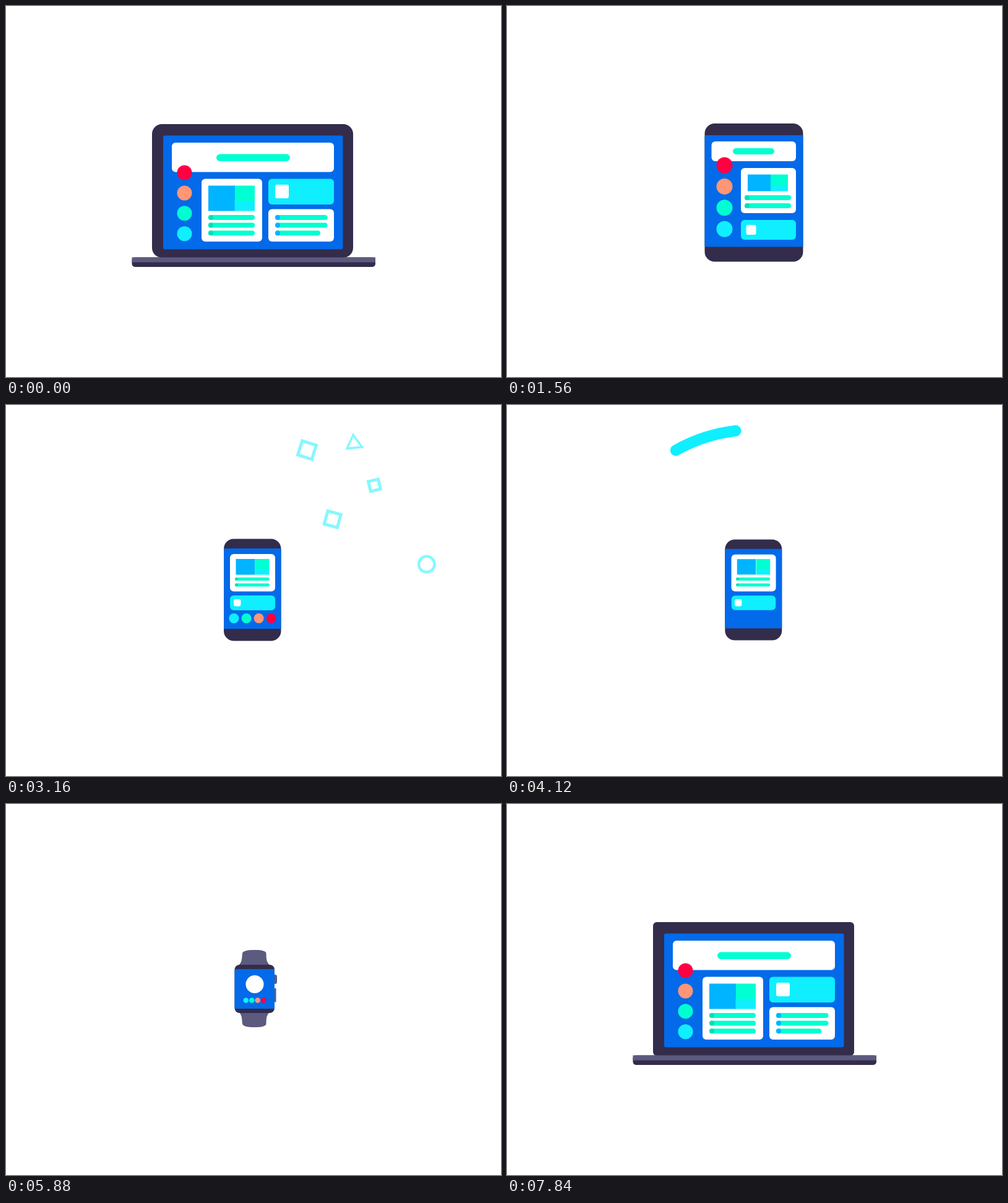
An HTML page with a canvas for the animation above (7.96 s loop, 800 by 600 pixels).

```html
<!DOCTYPE html>
<html>
<head>
<meta charset="utf-8">
<title>Devices</title>
<style>
html, body { margin: 0; width: 100%; height: 100%; overflow: hidden; background: #fff; }
canvas { display: block; }
</style>
</head>
<body>
<canvas id="stage" width="800" height="600"></canvas>
<script>
const g = document.getElementById('stage').getContext('2d');
const LOOP = 7960, RAD = Math.PI / 180;
const DARK = '#332c4b', GREY = '#5c5a7e', BLUE = '#036ae9', CYAN = '#0fefff', GREEN = '#00ffd2',
      SKY = '#00b4ff', RED = '#ff0044', ORANGE = '#ff9676', CAP = '#00e0b8', WHITE = '#fff';

const clamp = v => Math.max(0, Math.min(1, v));
const ease = v => (v = clamp(v), v * v * (3 - 2 * v));
const mix = (a, b, p) => a + (b - a) * p;

// Steps: laptop > tablet > phone > watch > laptop
const steps = [
  { at: 40, wait: 0, len: 600, dot: 102, gap: 110, arc: [0, -40, 140, GREEN] },
  { at: 1960, wait: 400, len: 600, dot: 300, gap: 66, arc: [40, 150, 330, CYAN] },
  { at: 3920, wait: 150, len: 600, dot: 250, gap: 60, arc: [40, -128, 70, CYAN] },
  { at: 5880, wait: 50, len: 500, dot: 352, gap: 66, arc: [104, 120, 322, '#f5003c'] }
];
let step, age, morph;

// ---- Device and page parts ----
function fillBox([x, y, w, h, r], color) {
  if (w < 0.2 || h < 0.2) return;
  g.fillStyle = color;
  g.beginPath();
  g.roundRect(x, y, w, h, Math.min(r, w / 2, h / 2));
  g.fill();
}

const collapse = b => [b[0] + b[2] / 2, b[1] + b[3] / 2, 0, 0, b[4]];

// One box per device; a missing one shrinks to the middle of its neighbour.
function part(color, ...boxes) {
  let a = boxes[step], b = boxes[step === 3 && !boxes[4] ? 0 : step + 1];
  if (!a && !b) return;
  a = a || collapse(b);
  b = b || collapse(a);
  fillBox(a.map((v, i) => mix(v, b[i], morph)), color);
}

function base() {
  const s = step === 0 ? 1 - morph : step === 3 ? morph : 0;
  if (s < 0.01) return;
  const w = 393.5 * s, x = 400.25 - w / 2;
  fillBox([x, 406.5, w, 15.5, 5], DARK);
  g.fillStyle = GREY;
  g.fillRect(x, 406.5, w, 8);
}

function straps() {
  const s = step === 2 ? morph : step === 3 ? 1 - morph : 0;
  if (s < 0.01) return;
  g.save();
  g.translate(402, 298.5);
  g.scale(s, s);
  g.fillStyle = GREY;
  for (const side of [1, -1]) {
    g.save();
    g.scale(1, side);
    g.beginPath();
    g.moveTo(-28, -36);
    g.bezierCurveTo(-20, -42, -21, -48, -20, -57);
    g.quadraticCurveTo(-19, -62.5, 0, -62.5);
    g.quadraticCurveTo(18, -62.5, 18.5, -57);
    g.bezierCurveTo(19, -48, 18, -42, 27, -36);
    g.fill();
    g.restore();
  }
  fillBox([28, -22.5, 8, 15, 3], GREY);
  fillBox([28, -0.5, 6.5, 22.5, 1], GREY);
  g.restore();
}

function device() {
  straps();
  part(DARK, [236, 191, 325, 216, 16], [319.5, 190, 159, 223.5, 16], [352, 216.5, 92.5, 165, 16],
    [369.5, 260, 64.5, 78, 8], [236, 191, 325, 216, 6]);
  base();
  part(BLUE, [254, 209.5, 290.5, 184, 3], [319.5, 209, 159, 180.5, 2], [352, 232, 92.5, 130, 0], [369.5, 267, 64.5, 64, 0]);
  part(WHITE, [268, 221, 262, 47.5, 6], [330.5, 219, 136.5, 32, 6]);
  part(GREEN, [340, 239.5, 119, 11.5, 6], [365, 230, 67, 10, 5]);

  part(WHITE, [316, 279.5, 98, 101.5, 6], [378, 262, 89, 73, 6], [362, 241, 73, 60.5, 6], [387.5, 277, 29, 29, 15]);
  part(SKY, [327, 290.5, 43, 41, 0], [389, 272.5, 37, 27, 0], [371.5, 249, 31, 25.5, 0]);
  part(CYAN, [369.5, 315, 32.5, 16.5, 0], [426, 289.5, 28, 10, 0], [402.5, 265, 23, 9.5, 0]);
  part(GREEN, [370, 290.5, 32, 25, 0], [426, 272.5, 28, 17.5, 0], [402.5, 249, 23, 17, 0]);
  for (let i = 0; i < 3; i++) {
    const y = 338 + 12.6 * i, ty = 306 + 13 * i, py = 279 + 9.5 * i, few = i < 2;
    part(GREEN, [327, y, 75, 8, 4], few && [384, ty, 75, 8, 4], few && [370, py, 56, 5, 3]);
    part(CAP, [327, y, 8, 8, 4], few && [384, ty, 8, 8, 4], few && [370, py, 5, 5, 3]);
  }

  part(CYAN, [424, 279.5, 106, 41.5, 6], [378, 346, 89, 32, 6], [362, 308, 73, 24, 6]);
  part(WHITE, [435, 289, 22, 22, 3], [386.5, 354, 16, 16, 3], [368, 314, 11.5, 11.5, 3]);

  part(WHITE, [424, 328.5, 106, 52.5, 6]);
  for (let i = 0; i < 3; i++) {
    const y = 338 + 12.6 * i;
    part(GREEN, [435, y, i < 2 ? 84.5 : 73, 8, 4]);
    part(SKY, [435, y, 8, 8, 4]);
  }
}

// ---- Four coloured dots ----
function dotPlace(state, i) {
  return [
    [288.5, 269.5 + 32.9 * i, 12],
    [351.5, 257.5 + 34.4 * i, 13],
    [428.7 - 20.1 * i, 345, 8],
    [416.2 - 9.5 * i, 317.5, 4.3]
  ][state % 4];
}

function dots() {
  const s = steps[step];
  [RED, ORANGE, GREEN, CYAN].forEach((color, i) => {
    const q = ease((age - s.dot - s.gap * i) / 400);
    const a = dotPlace(step, i), b = dotPlace(step + 1, i);
    let [x, y, r] = a.map((v, k) => mix(v, b[k], q));
    if (step === 0) y -= 7 * Math.sin(Math.PI * q);
    if (step === 3) {
      if (q > 0) {
        x = mix(440, b[0], q);
        y = mix(277 + 9 * i, b[1], q);
        r = b[2] * q ** 0.45;
      } else r = a[2] * (1 - clamp(age / 200));
    }
    if (step === 2) g.globalAlpha = clamp(Math.max(1 - age / 200, (age - 500) / 530 + 0.15 * i));
    g.fillStyle = color;
    g.beginPath();
    g.arc(x, y, r, 0, 7);
    g.fill();
    g.globalAlpha = 1;
  });
}

// ---- Sweeping stroke ----
function sweep() {
  const [wait, from, to, color] = steps[step].arc;
  const at = d => mix(from, to, ease((age - wait - d) / 640));
  const head = at(0), tail = at(80), len = head - tail;
  if (len < 0.5) return;
  g.strokeStyle = color;
  g.lineCap = 'round';
  g.lineWidth = 18 * Math.min(1, len / 20);
  g.beginPath();
  g.arc(400, 300, 260, tail * RAD, head * RAD);
  g.stroke();
}

// ---- Outlined confetti ----
const AGES = [0, 0.25, 0.4, 0.8, 1];
function keyed(row, a) {
  let i = 0;
  while (i < 3 && a > AGES[i + 1]) i++;
  return mix(row[i], row[i + 1], (a - AGES[i]) / (AGES[i + 1] - AGES[i]));
}

// dist and spin follow AGES; size is the distance from centre to corner
const pieces = [
  { sides: 0, dir: 184, dist: [175, 236, 241, 283, 288], spin: [0, 0, 0, 0, 0], size: a => 5.8 + 8.7 * a },
  { sides: 4, dir: 150.6, dist: [105, 123, 138, 172, 182], spin: [-45, -24, -8, 28, 48], size: a => 0.71 * (9 + 16 * a) },
  { sides: 4, dir: 151.6, dist: [260, 247, 248, 259, 281], spin: [57, 42, 42, 89, 86], size: a => 0.71 * (12.5 + 6 * a * a) },
  { sides: 3, dir: 137, dist: [90, 135, 192, 288, 298], spin: [40, 64, 95, 97, 78], size: a => 4 + 12.5 * a },
  { sides: 4, dir: 123.5, dist: [200, 210, 211, 243, 247], spin: [6, 15, 17, 30, 54], size: a => 0.71 * (14.5 + 11.5 * a) }
];

// time, age and turn at that time, life speed in ms, colours
const bursts = [
  [760, 0.4, 0, 700, '#14f7d2'],
  [3160, 0.8, 167.3, 900, CYAN],
  [4800, 1, -42.7, 500, CYAN],
  [4800, 0.25, -101.4, 700, CYAN],
  [6480, 0, 77.8, 700, GREEN, CYAN],
  [6480, 0, 257.8, 700, GREEN, CYAN],
  [6620, 0, 115, 1000, GREEN, CYAN]
];
const drift = a => 110 * (1 - Math.exp(-1.5 * a));

function confetti(t) {
  for (const [at, a0, turn0, life, color, ringColor = color] of bursts) {
    const a = a0 + (t - at) / life;
    if (a < -0.1 || a > 1.2) continue;
    const turn = turn0 + drift(a) - drift(a0);
    const grow = clamp((a + 0.1) / 0.1);
    g.globalAlpha = a < 1 ? 1 - 0.5 * clamp((a - 0.45) / 0.35) : 0.5 * (1.2 - a) / 0.2;
    g.lineJoin = 'miter';
    for (const p of pieces) {
      const dir = (p.dir + turn) * RAD, d = keyed(p.dist, a), r = p.size(a) * grow;
      if (r <= 0) continue;
      const x = 400 + d * Math.cos(dir), y = 300 + d * Math.sin(dir);
      g.strokeStyle = p.sides ? color : ringColor;
      g.lineWidth = (2 + 3 * a + (p.sides === 4 ? 0.6 : 0) - (p.sides === 3 ? 0.8 : 0)) * grow;
      g.beginPath();
      if (p.sides) {
        const spin = keyed(p.spin, a) + turn + (p.sides === 4 ? 45 : 0);
        for (let k = 0; k < p.sides; k++) {
          const c = (spin + 360 * k / p.sides) * RAD;
          g.lineTo(x + r * Math.cos(c), y + r * Math.sin(c));
        }
        g.closePath();
      } else g.arc(x, y, r, 0, 7);
      g.stroke();
    }
  }
  g.globalAlpha = 1;
}

const start = performance.now();
function draw() {
  const t = (performance.now() - start) % LOOP;
  step = 0;
  while (step < 3 && t >= steps[step + 1].at) step++;
  const s = steps[step];
  age = t - s.at;
  morph = ease((age - s.wait) / s.len);
  g.fillStyle = WHITE;
  g.fillRect(0, 0, 800, 600);
  confetti(t);
  sweep();
  device();
  dots();
  requestAnimationFrame(draw);
}
draw();
</script>
</body>
</html>
```
